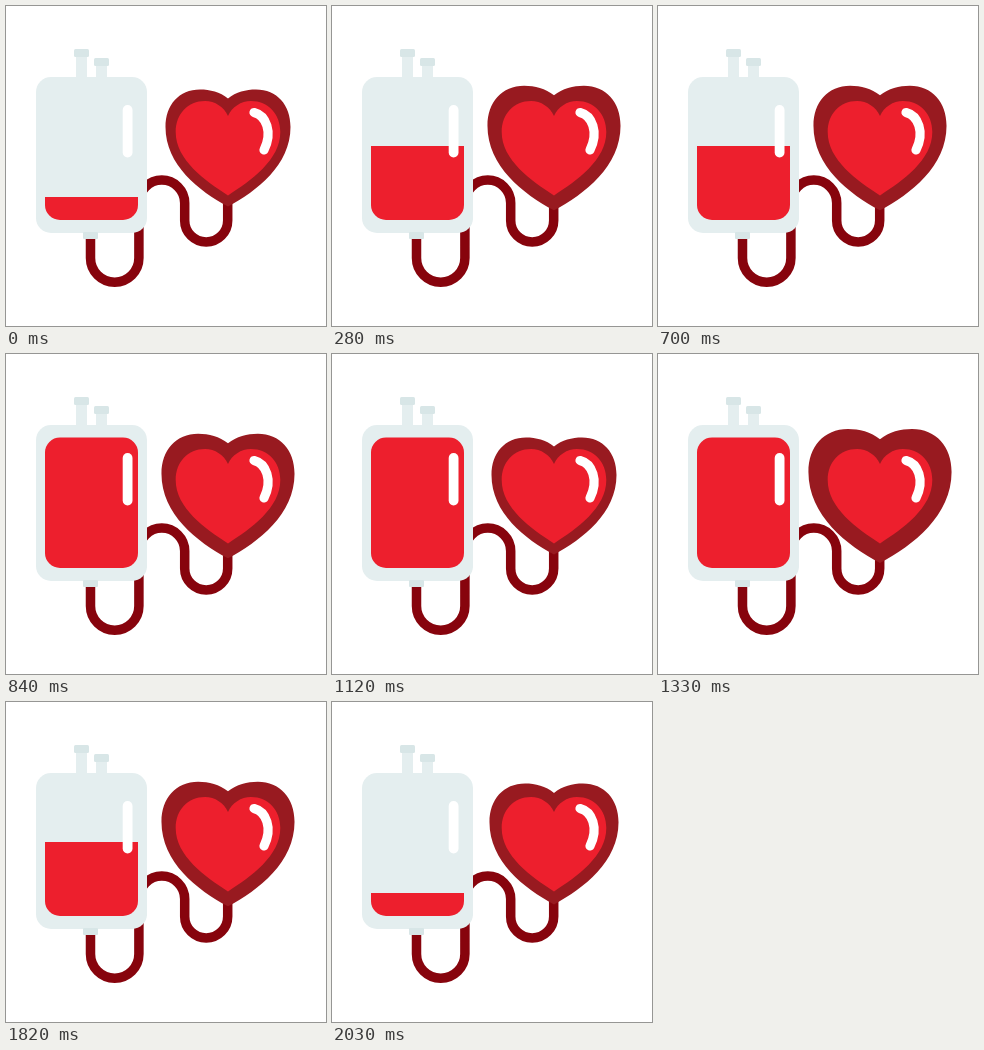
Recreate the animation shown at these times as an HTML page. Size 320 by 320 pixels, loop 2.1 s.

```html
<!DOCTYPE html>
<html lang="en">
<head>
<meta charset="utf-8">
<title>Blood donation</title>
<style>
  html, body { margin: 0; width: 100%; height: 100%; overflow: hidden; background: #fff; }
  svg { display: block; width: 100vw; height: 100vh; }
</style>
</head>
<body>
<svg viewBox="0 0 320 320">
  <defs>
    <clipPath id="chamber"><rect x="39" y="83.500" width="93" height="130.500" rx="15"/></clipPath>
  </defs>

  <path d="M84.500 230V252A24.200 24.200 0 0 0 132.900 252V197A22.900 22.900 0 0 1 178.700 197V214.500A21.500 21.500 0 0 0 221.700 214.500V190"
        fill="none" stroke="#87040d" stroke-width="9.500"/>

  <g fill="#e4eeef">
    <rect x="70" y="48" width="11" height="26"/>
    <rect x="90" y="57" width="11" height="17"/>
    <rect x="30" y="71" width="111" height="156" rx="15"/>
  </g>
  <g fill="#d8e6e7">
    <rect x="68" y="43" width="15" height="8" rx="1.500"/>
    <rect x="88" y="52" width="15" height="8" rx="1.500"/>
    <rect x="77" y="226" width="15" height="7" rx="1"/>
  </g>
  <g clip-path="url(#chamber)">
    <rect id="blood" x="38" width="96" height="140" fill="#ed1f2d"/>
  </g>
  <rect x="116.700" y="99" width="9.800" height="52.500" rx="4.900" fill="#fff"/>

  <path id="rim" fill="#981a20"
        d="M222 92.500C214 86 204 83.500 194 83.500C173 83.500 159.500 99 159.500 121C159.500 159 193 185 222 200.500C251 185 284.500 159 284.500 121C284.500 99 271 83.500 250 83.500C240 83.500 230 86 222 92.500Z"/>
  <path fill="#ed1f2d"
        d="M222 110C218 101 209 95 199 95C182 95 169.700 108 169.700 126C169.700 154 199 174.500 222 189.500C245 174.500 274.300 154 274.300 126C274.300 108 262 95 245 95C235 95 226 101 222 110Z"/>
  <path d="M248 106.500C260 109.500 267 126 258 144" fill="none" stroke="#fff" stroke-width="9.200" stroke-linecap="round"/>
</svg>
<script>
  const STEP = 70, LOOP = 2100, BEAT = 8;
  const REST_WIDTH = 124;
  const beatWidths = [124, 128, 132, 142, 132, 128, 124, 124];
  const levels = [191, 140, 83, 140, 191];
  const blood = document.getElementById('blood');
  const rim = document.getElementById('rim');

  function draw(ms) {
    const tick = Math.floor((ms % LOOP) / STEP);
    const scale = beatWidths[tick % BEAT] / REST_WIDTH;
    rim.setAttribute('transform', `translate(222 142) scale(${scale}) translate(-222 -142)`);
    // The level changes just after each peak of the beat.
    blood.setAttribute('y', levels[Math.floor((tick + BEAT / 2) / BEAT)]);
  }

  const start = performance.now();
  function loop() {
    draw(performance.now() - start);
    requestAnimationFrame(loop);
  }
  loop();
</script>
</body>
</html>
```
